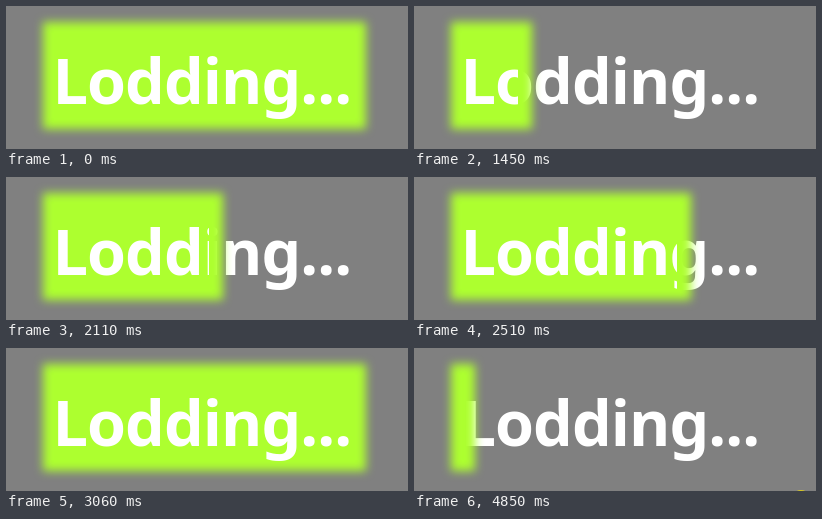
Recreate the animation shown at these times as an HTML page. Size 402x143 px, loop 4990 ms.

```html
<!DOCTYPE html>
<html lang="en">
<head>
<meta charset="utf-8">
<title>Lodding</title>
<style>
  html, body { margin: 0; width: 100%; height: 100%; overflow: hidden; background: #808080; }
  svg { display: block; }
  text { font: 700 63px "Noto Sans", "Open Sans", sans-serif; fill: #fff; letter-spacing: -1px; }
</style>
</head>
<body>
<svg width="402" height="143" viewBox="0 0 402 143">
  <defs>
    <filter id="soft" filterUnits="userSpaceOnUse" x="0" y="0" width="402" height="143" color-interpolation-filters="sRGB">
      <feGaussianBlur stdDeviation="5"/>
    </filter>
    <clipPath id="filled"><rect id="window" x="47" y="0" height="143"/></clipPath>
  </defs>
  <text x="46.5" y="98">Lodding...</text>
  <rect id="glow" x="37" y="16" height="107" fill="#adff2f" filter="url(#soft)"/>
  <text x="46.5" y="98" clip-path="url(#filled)">Lodding...</text>
  <ellipse id="pointer" cx="387" cy="147" rx="7" ry="5" fill="#d8c820"/>
</svg>
<script>
  const LOOP = 4990, EMPTY_AT = 720, FILL_AT = 1120, RESET_AT = 4650, POINTER_AT = 4850;
  const STEP = 66.2, LAST_STEP = 29, FULL = 299, SPREAD = 12;
  const SPEED = 0.15, MOTION_START = 1070;
  const byId = id => document.getElementById(id);
  const stepStart = k => FILL_AT + 10 * Math.round(k * STEP / 10);

  function fillWidth(t) {
    if (t < EMPTY_AT) return FULL;
    if (t < FILL_AT || t >= RESET_AT) return 0;
    let k = Math.floor((t - FILL_AT) / STEP) + 1;
    while (stepStart(k) > t) k--;
    return k >= LAST_STEP ? FULL : SPEED * (stepStart(k) - MOTION_START);
  }

  function draw(t) {
    const width = fillWidth(t);
    byId("glow").setAttribute("width", width + 2 * SPREAD);
    byId("window").setAttribute("width", width);
    byId("pointer").style.display = t >= POINTER_AT ? "" : "none";
  }

  const start = performance.now();
  function tick() {
    draw((performance.now() - start) % LOOP);
    requestAnimationFrame(tick);
  }
  draw(0);
  requestAnimationFrame(tick);
</script>
</body>
</html>
```
